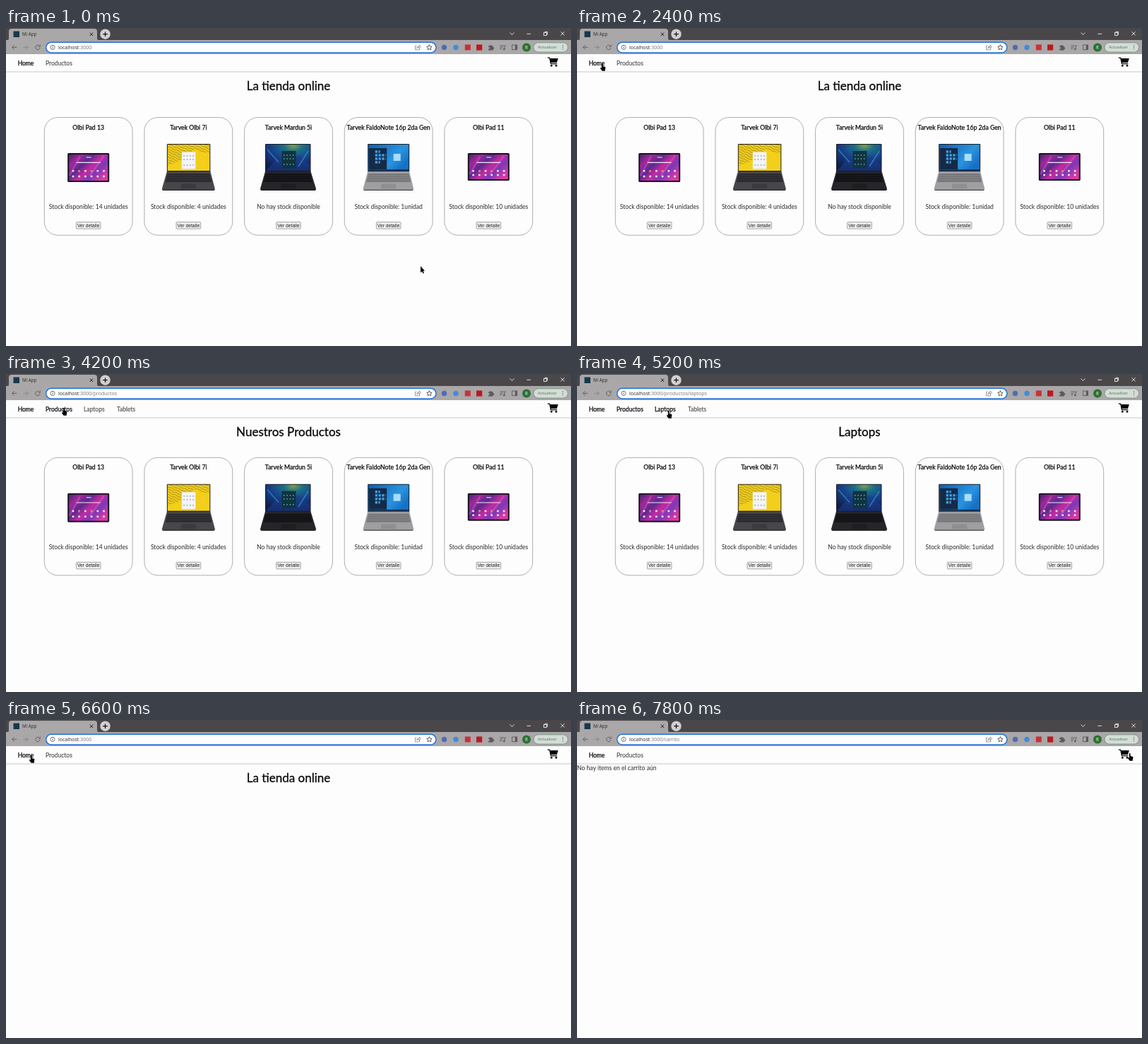
An HTML page for the animation above (8000 ms loop, 800 by 450 pixels).

```html
<!DOCTYPE html>
<html lang="es">
<head>
<meta charset="utf-8">
<title>Mi App</title>
<style>
  html, body { margin: 0; width: 100%; height: 100%; overflow: hidden; background: #fefdfe; }
  svg { display: block; width: 100vw; height: 100vh; }
  text { font: 8.6px Lato, sans-serif; fill: #2a2a2a; white-space: pre; }
  .bold { fill: #0a0a0a; stroke: #0a0a0a; stroke-width: .25px; }
  .mid { text-anchor: middle; }
  #title { font-size: 17.05px; stroke-width: .3px; }
  .name { font-size: 8.7px; }
  .btn { font: 6.7px "Liberation Sans", Arial, sans-serif; fill: #222; }
  .nav { font-size: 8.5px; fill: #484848; stroke: #484848; stroke-width: .12px; }
  .nav.on { fill: #0a0a0a; stroke: #0a0a0a; stroke-width: .25px; }
  .ui { font-family: "Open Sans", sans-serif; }
  .line { fill: none; stroke: #5c595c; stroke-width: .9; }
</style>
</head>
<body>
<svg viewBox="0 0 800 450" preserveAspectRatio="none">
  <defs>
    <linearGradient id="pink" x2="1" y2=".7">
      <stop stop-color="#4a2470"/><stop offset=".22" stop-color="#a0289c"/>
      <stop offset=".42" stop-color="#5a2a90"/><stop offset=".6" stop-color="#c42aa0"/>
      <stop offset=".78" stop-color="#7a3ab8"/><stop offset="1" stop-color="#d838a4"/>
    </linearGradient>
    <radialGradient id="night" cx=".62" cy=".05" r=".95">
      <stop stop-color="#7ba04a"/><stop offset=".22" stop-color="#1d7088"/>
      <stop offset=".55" stop-color="#17408c"/><stop offset="1" stop-color="#101c48"/>
    </radialGradient>
    <linearGradient id="sky" x2="1" y2=".6">
      <stop stop-color="#0c60b4"/><stop offset=".7" stop-color="#2a94e0"/><stop offset="1" stop-color="#1670c4"/>
    </linearGradient>
    <pattern id="waves" width="9" height="3.4" patternUnits="userSpaceOnUse" patternTransform="rotate(24)">
      <path d="M0 1.7Q2.25 .3 4.5 1.7T9 1.7" fill="none" stroke="#6a590c" stroke-width=".6"/>
    </pattern>
  </defs>

  <!-- Browser frame -->
  <path d="M0 0H800V18H0Z" fill="#4a474a"/>
  <path d="M0 17H800V37H0Z" fill="#aaa7a9"/>
  <path d="M1 18Q4 18 4 14V5Q4 1 8 1H125Q129 1 129 5V14Q129 18 133 18Z" fill="#aaa7a9"/>
  <rect x="10.5" y="4.5" width="8.5" height="8.5" fill="#17394a"/>
  <text class="ui" x="23" y="11" style="font-size:6.2px">Mi App</text>
  <path class="line" d="M118.8 6.6l4.4 4.4m0-4.4l-4.4 4.4" style="stroke:#111"/>
  <circle cx="140.5" cy="8.7" r="7.2" fill="#d2cfd2"/>
  <path class="line" d="M137.2 8.7h6.6M140.5 5.4V12" style="stroke:#111;stroke-width:1.2"/>
  <g class="line" style="stroke:#eee">
    <path d="M713.6 6.6l2.9 2.8 2.9-2.8M737.5 8.3h5.5M785.5 5.3l5.2 5.2m0-5.2l-5.2 5.2"/>
    <rect x="761.5" y="6.5" width="3.8" height="4"/><path d="M763 6V5.3h3.6V9.3H766"/>
  </g>
  <path class="line" d="M15.3 27.3H8.6m3.1-3.1l-3.1 3.1 3.1 3.1"/>
  <path class="line" d="M24.5 27.3h6.7m-3.1-3.1l3.1 3.1-3.1 3.1" style="stroke:#858285"/>
  <path class="line" d="M47.2 25.2A3.2 3.2 0 1 0 48 28.2M48.3 23.6v2.7h-2.7"/>
  <rect x="56.7" y="20.2" width="552.2" height="14.8" rx="7.4" fill="#fefdfe" stroke="#2273d8" stroke-width="1.5"/>
  <circle class="line" cx="66" cy="27.4" r="3.1" style="stroke-width:.8"/>
  <path class="line" d="M66 26.9v2.1M66 25.2v.9"/>
  <text class="ui" x="74" y="29.9" style="font-size:7px">localhost<tspan id="path" fill="#77747a"></tspan></text>
  <path class="line" d="M581.5 25.3h-2v5.5h6.2v-1.8M581.6 28.8q.3-3 3.6-3v-1.8l2.2 2.5-2.2 2.4v-1.8q-2.2 0-3.6 1.7Z" style="stroke-width:.6"/>
  <path class="line" d="M599.4 23.7l1.1 2.4 2.6.3-1.9 1.8.5 2.6-2.3-1.3-2.3 1.3.5-2.6-1.9-1.8 2.6-.3Z" style="stroke:#333;stroke-width:.8"/>
  <circle cx="620.5" cy="27.4" r="3.7" fill="#4d6cb4"/>
  <circle cx="637" cy="27.4" r="3.7" fill="#3f8cdc"/>
  <rect x="649.8" y="23.4" width="8" height="8" fill="#c9303a"/>
  <rect x="666" y="23.4" width="8.2" height="8.2" fill="#bb1a20"/>
  <path d="M683 25.2h2a1.3 1.3 0 1 1 2.6 0h2v2.1a1.3 1.3 0 1 1 0 2.5v1.7H683v-2a1.3 1.3 0 1 0 0-2.4Z" fill="#5c595c"/>
  <path class="line" d="M699.3 25h6M699.3 27.3h4M699.3 29.5h3M706 30V25h2"/><circle cx="705.2" cy="30" r="1.3" fill="#5c595c"/>
  <rect class="line" x="716.6" y="24" width="7" height="6.6"/><path d="M720.8 24h2.8v6.6h-2.8Z" fill="#5c595c"/>
  <circle cx="737" cy="27.4" r="6" fill="#2c7030"/>
  <text class="ui mid" x="737" y="29.7" style="font-size:6.2px;fill:#fff">R</text>
  <rect x="747" y="20.8" width="48.5" height="13.2" rx="6.6" fill="#d6dcd7" stroke="#6b9277" stroke-width=".8"/>
  <text class="ui" x="753" y="29.4" style="font-size:5.9px;fill:#3f7d53">Actualizar</text>
  <path d="M788.5 24.7v6" stroke="#35804c" stroke-width="1.4" stroke-linecap="round" stroke-dasharray="0 2.6"/>

  <!-- Site -->
  <path d="M0 37H800V450H0Z" fill="#fefdfe"/>
  <path d="M0 62H800" stroke="#c8c6c8"/>
  <g id="nav"></g>
  <g id="cart">
    <path d="M766.8 41.6h3.2l.6 1.4h11.2l-1.9 5.9H771.9l.2 1.2h8.2v1.2h-9.3l-1.8-8.5h-2.4Z"/>
    <circle cx="772.3" cy="53.3" r="1.4"/><circle cx="779" cy="53.3" r="1.4"/>
  </g>
  <text id="title" class="bold mid" x="400" y="87.8"></text>
  <text id="empty" x="0" y="71">No hay items en el carrito aún</text>
  <g id="cards"></g>
  <path id="arrow" d="M0 0V9.2L2.1 7.3 3.5 10.4 4.9 9.7 3.6 6.8H6Z"/>
  <path id="hand" d="M1.8 1Q1.9 0 2.7 0T3.6 1V4L6.6 4.7Q7.5 5 7.4 6L6.8 9V10.8H2.6L.2 7.4Q-.4 6.2.6 6L1.8 6.8Z"/>
</svg>
<script>
const $ = id => document.getElementById(id);

const tablet = h => `
  <rect x="-29.5" y="177" width="59" height="${h}" rx="1.6" fill="#17151c"/>
  <rect x="-27.5" y="179" width="55" height="${h - 4}" fill="url(#pink)"/>
  <path d="M-27 ${h + 168}L-12 182M2 ${h + 168}L22 181" stroke="#f060c0" stroke-width="2.4" opacity=".4"/>
  <path d="M-3 183h7" stroke="#fff" stroke-width="1.2" opacity=".8"/>
  <path d="M-17 190.3h34" stroke="#f2e8f6" stroke-width="1.2"/>
  <path d="M-23 202.3h47M-23 ${h + 169}h47" stroke="#f3e9f5" stroke-width="2.6" stroke-dasharray="2.6 6.1"/>
  <path d="M-14.3 202.3h30" stroke="#ef6a58" stroke-width="2.4" stroke-dasharray="2.6 14.8"/>`;

// Screen and keyboard are given by their left and right edges.
const laptop = ([left, right], [baseLeft, baseRight], fill, body, keys, content) => `
  <rect x="${left}" y="164" width="${right - left}" height="40" rx="1.2" fill="#1c1c20"/>
  <rect x="${left + 1}" y="165" width="${right - left - 2}" height="37" fill="${fill}"/>
  ${content}
  <path d="M${left} 203H${right}L${baseRight} 227.5Q${baseRight} 230 ${baseRight - 2} 230H${baseLeft + 2}Q${baseLeft} 230 ${baseLeft} 227.5Z" fill="${body}"/>
  <path d="M${left + 1} 206H${right - 1}L${right + 2} 218H${left - 2}Z" fill="${keys}"/>
  <path d="M${left + 2} 208.7H${right - 2}M${left + 1} 211.7H${right - 1}M${left} 214.9H${right}" stroke="${body}" stroke-width=".6" stroke-dasharray="2.5 .8"/>
  <path d="M-10 220.5H10L11 227.5H-11Z" fill="${keys}" opacity=".4"/>
  <path d="M${baseLeft + 1} 229.4H${baseRight - 1}" stroke="#18181a" stroke-width=".8"/>`;

const yellowLaptop = laptop([-30.5, 31], [-37.5, 37.5], '#f3cf1c', '#47464a', '#2b2a2e', `
  <path d="M-29.5 165H30V178L8 172-8 186-29.5 195Z" fill="url(#waves)"/>
  <rect x="-9.5" y="175.5" width="19.5" height="24" fill="#f4f4f6"/>
  <path d="M-7 181h15M-7 186h15M-7 194h15" stroke="#8aa0b8" stroke-width="1.6" stroke-dasharray="1.6 2.7"/>`);

const darkLaptop = laptop([-33, 31.5], [-40, 39], 'url(#night)', '#25252a', '#131316', `
  <path d="M-32 202L-16 184 0 193 14 180 30.5 194V202Z" fill="#1c3c8c" opacity=".6"/>
  <path d="M-30 172L-14 190M14 196L28 174" stroke="#3aa4c4" stroke-width="1.6" opacity=".6"/>
  <rect x="-9.5" y="174" width="20" height="24.5" fill="#10343f"/>
  <path d="M-7 180h15M-7 185h15M-7 193h15" stroke="#5da7b0" stroke-width="1.6" stroke-dasharray="1.6 2.7"/>`);

const silverLaptop = laptop([-29.5, 29.5], [-36, 35.5], 'url(#sky)', '#9f9ea1', '#77767a', `
  <rect x="-28" y="170" width="25.5" height="30" fill="#152a46"/>
  <path d="M-19 175h7M-19 180h15M-19 185h15M-19 190h7" stroke="#3f9be0" stroke-width="3.4" stroke-dasharray="3.4 1.4"/>
  <path d="M-28 201h56.5" stroke="#14233c" stroke-width="1.6"/>
  <rect x="7" y="178" width="10" height="10" fill="#a8dcfa"/>`);

const products = [
  ['Olbi Pad 13', 'Stock disponible: 14 unidades', tablet(41)],
  ['Tarvek Olbi 7i', 'Stock disponible: 4 unidades', yellowLaptop],
  ['Tarvek Mardun 5i', 'No hay stock disponible', darkLaptop],
  ['Tarvek FaldoNote 16p 2da Gen', 'Stock disponible: 1unidad', silverLaptop],
  ['Olbi Pad 11', 'Stock disponible: 10 unidades', tablet(39)]
];

$('cards').innerHTML = products.map(([name, stock, picture], i) => `
  <g transform="translate(${116.7 + i * 141.65})">
    <rect x="-62.4" y="126.6" width="124.8" height="166.6" rx="19" fill="#fefdfe" stroke="#949294" stroke-width=".75"/>
    <text class="bold mid name" y="143.6">${name}</text>
    ${picture}
    <text class="mid" y="256">${stock}</text>
    <rect x="-17.3" y="274.6" width="34.6" height="9.6" rx="1" fill="#efeeef" stroke="#858585" stroke-width=".7"/>
    <text class="btn mid" y="281.5">Ver detalle</text>
  </g>`).join('');

const links = [['Home', 16.7], ['Productos', 56], ['Laptops', 110], ['Tablets', 157]];
$('nav').innerHTML = links.map(([label, x]) => `<text class="nav" x="${x}" y="52.6">${label}</text>`).join('');

const home = { path: '', title: 'La tienda online', active: [0], links: 2, shift: 0 };
const shop = (path, title, active) => ({ path: '/productos' + path, title, active, links: 4, shift: -8.3 });
const cart = { path: '/carrito', title: '', active: [0], links: 2, shift: 0 };

// Start time, page, time at which its cards are loaded.
const visits = [
  [0, home, 0],
  [3000, shop('', 'Nuestros Productos', [0, 1]), 3400],
  [4800, shop('/laptops', 'Laptops', [0, 1, 2]), 5200],
  [5800, shop('/tablets', 'Tablets', [0, 1, 3]), 6200],
  [6400, home, 7000],
  [7600, cart, Infinity]
];

// Time and pointer position.
const moves = [
  [0, 587, 337], [1400, 587, 337], [2200, 33, 50], [2600, 33, 50],
  [2800, 79, 48], [4200, 79, 48], [4600, 127, 52], [5200, 127, 52],
  [5600, 169, 50], [6000, 169, 50], [6400, 33, 50], [7000, 33, 50],
  [7600, 780, 47], [8000, 780, 47]
];

function pointerAt(t) {
  const i = moves.findIndex(m => m[0] > t);
  const [t0, x0, y0] = moves[i - 1], [t1, x1, y1] = moves[i];
  const p = (t - t0) / (t1 - t0), k = p * p * (3 - 2 * p);
  return [x0 + (x1 - x0) * k, y0 + (y1 - y0) * k];
}

const show = (el, on) => { el.style.display = on ? '' : 'none'; };

function draw(t) {
  const [, page, loaded] = visits.filter(v => v[0] <= t).pop();
  $('path').textContent = ':3000' + page.path;
  $('title').textContent = page.title;
  [...$('nav').children].forEach((el, i) => {
    show(el, i < page.links);
    el.classList.toggle('on', page.active.includes(i));
  });
  show($('empty'), page === cart);
  show($('cards'), t >= loaded);
  $('cards').setAttribute('transform', `translate(0 ${page.shift})`);

  const [x, y] = pointerAt(t);
  const overLink = y < 60 && (x < 185 || x > 762);
  show($('hand'), overLink);
  show($('arrow'), !overLink);
  $(overLink ? 'hand' : 'arrow').setAttribute('transform', `translate(${x} ${y})`);
}

const LOOP = 8000, STEP = 200;
let last = -1;
function tick() {
  const t = Math.floor(performance.now() % LOOP / STEP) * STEP;
  if (t !== last) draw(last = t);
  requestAnimationFrame(tick);
}
tick();
</script>
</body>
</html>
```
